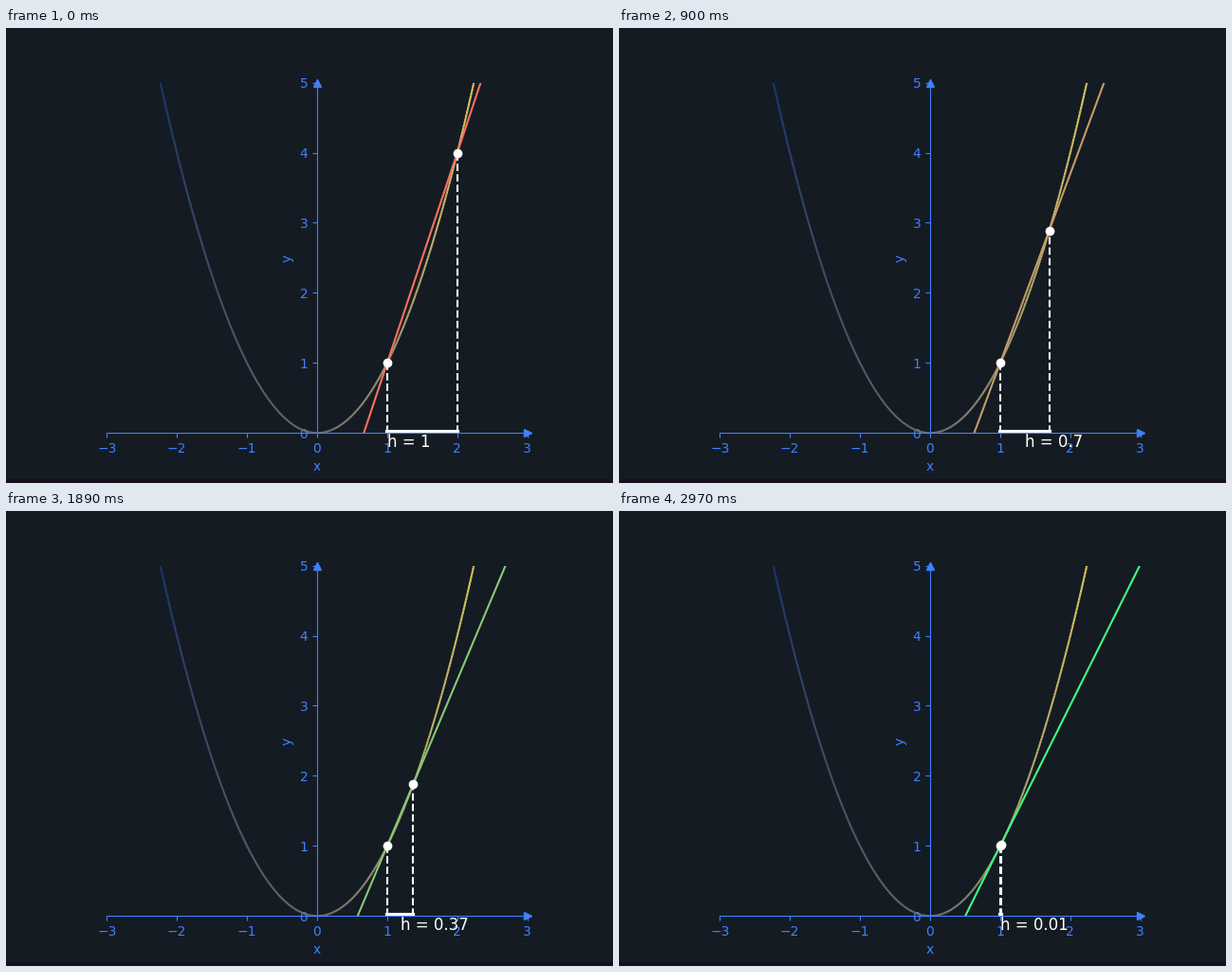
Write a matplotlib script that moves like this. It is 640 px wide and 480 px high and loops after 4650 ms.

```python
import numpy as np
import matplotlib.pyplot as plt
from matplotlib.animation import FuncAnimation
from matplotlib.collections import LineCollection
from matplotlib.colors import to_rgb
from matplotlib.patches import Rectangle

BG, STRIP, BLUE = "#141b23", "#160f1d", "#4080ff"
WARM, COOL = np.array(to_rgb("#ff7060")), np.array(to_rgb("#40ff80"))
STEPS, FRAMES, INTERVAL = 100, 155, 30
X0 = 1.0


def f(x):
    return x ** 2


fig, ax = plt.subplots(figsize=(6.4, 4.8), dpi=100, facecolor=BG)
fig.add_artist(Rectangle((0, 0), 1, 4 / 480, transform=fig.transFigure,
                         color=STRIP, lw=0))

# Axes crossing at the origin, with arrow tips
ax.set_facecolor(BG)
ax.set_aspect("equal")
ax.set_xlim(-3, 3)
ax.set_ylim(0, 5)
ax.set_xlabel("x", color=BLUE)
ax.set_ylabel("y", color=BLUE)
ax.tick_params(colors=BLUE)
ax.spines[["top", "right"]].set_visible(False)
ax.spines[["left", "bottom"]].set_color(BLUE)
ax.spines["left"].set_position("zero")
ax.spines["bottom"].set_position("zero")
ax.plot(1, 0, ">", color=BLUE, transform=ax.get_yaxis_transform(), clip_on=False)
ax.plot(0, 1, "^", color=BLUE, transform=ax.get_xaxis_transform(), clip_on=False)

# Parabola coloured along x
xs = np.linspace(-3, 3, 500)
pts = np.column_stack([xs, f(xs)])
curve = LineCollection(np.stack([pts[:-1], pts[1:]], axis=1), cmap="cividis",
                       norm=plt.Normalize(-3, 3), linewidth=1.5)
curve.set_array(xs[:-1])
ax.add_collection(curve, autolim=False)

secant, = ax.plot([], [], lw=1.5)
ax.plot([X0, X0], [0, f(X0)], "--", color="white", lw=1.5)
drop, = ax.plot([], [], "--", color="white", lw=1.5)
gap, = ax.plot([], [], color="white", lw=3)
ax.plot(X0, f(X0), "o", color="white")
dot, = ax.plot([], [], "o", color="white")
label = ax.text(X0, -0.2, "", color="white", fontsize=12)


def update(n):
    h = round(1 - min(n, STEPS - 1) / STEPS, 2)
    x1 = X0 + h
    slope = (f(x1) - f(X0)) / h
    ends = np.array([-3, 3])
    secant.set_data(ends, f(X0) + slope * (ends - X0))
    secant.set_color(COOL + (WARM - COOL) * h)
    drop.set_data([x1, x1], [0, f(x1)])
    gap.set_data([X0, x1], [0.02, 0.02])
    dot.set_data([x1], [f(x1)])
    # The label starts at the fixed point, then jumps to the middle of the gap
    label.set_x(X0 + h / 2 if n else X0)
    label.set_text(f"h = {h:g}")
    return secant, drop, gap, dot, label


anim = FuncAnimation(fig, update, frames=FRAMES, interval=INTERVAL,
                     init_func=lambda: update(0), repeat=True, repeat_delay=0)
plt.show()
```
